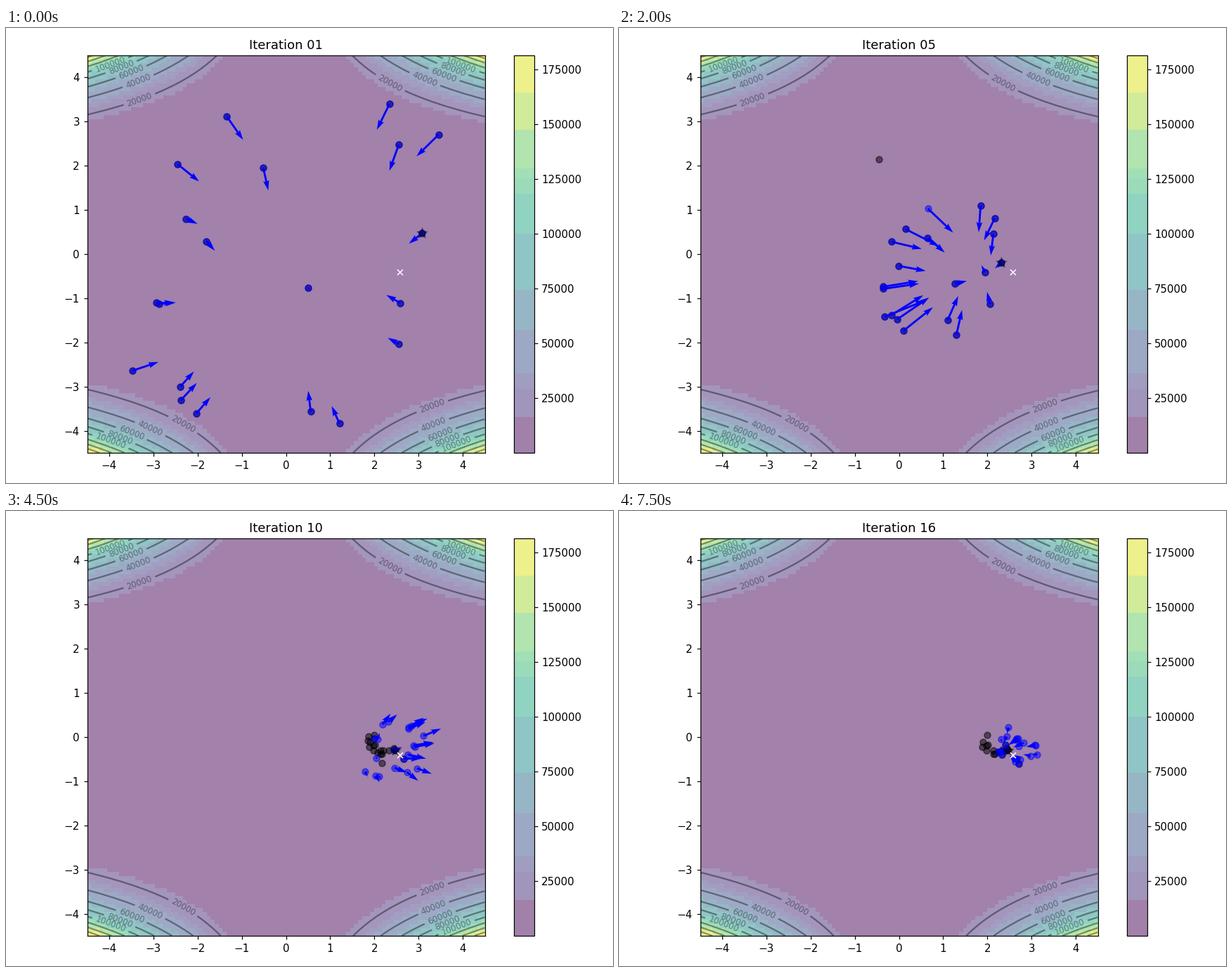
Animation of 864x648 px, one loop 8000 ms. Source, as a matplotlib script:

```python
import numpy as np
import matplotlib.pyplot as plt
from matplotlib.animation import FuncAnimation
from matplotlib.colors import ListedColormap

W, H, DPI = 864, 648, 108
LEFT, BOTTOM, SIDE = 115.5, 43, 566     # plot square in pixels
LIM = 4.5
N_FRAMES, N_PARTICLES = 16, 20
INERTIA, C1, C2 = 0.8, 0.1, 0.1


def cost(x, y):
    return ((1.5 - x - x * y) ** 2
            + (2.25 - x + x * y ** 2) ** 2
            + (2.625 - x + x * y ** 3) ** 2)


def swarm_history(steps):
    """Particle swarm states (positions, velocities, bests, leader)."""
    rng = np.random.RandomState(100)
    pos = rng.rand(2, N_PARTICLES) * 2 * LIM - LIM
    vel = rng.randn(2, N_PARTICLES) * 0.1
    best, best_cost = pos.copy(), cost(*pos)
    leader = best[:, best_cost.argmin()].copy()
    states = []
    for _ in range(steps):
        r1, r2 = rng.rand(2)
        vel = (INERTIA * vel + C1 * r1 * (best - pos)
               + C2 * r2 * (leader[:, None] - pos))
        pos = pos + vel
        now = cost(*pos)
        better = best_cost >= now
        best[:, better] = pos[:, better]
        best_cost = np.minimum(best_cost, now)
        leader = best[:, best_cost.argmin()].copy()
        states.append((pos, vel, best.copy(), leader))
    return states


def banded_viridis():
    edges = np.array([0, 0.0895, 0.159, 0.198, 0.309, 0.41, 0.551,
                      0.652, 0.694, 0.717, 0.813, 0.906, 1])
    shades = (edges[:-1] + edges[1:]) / 2
    shades[0] = 0.01
    band = np.digitize(np.linspace(0, 1, 256), edges[1:-1])
    return ListedColormap(plt.get_cmap("viridis")(shades[band]))


def to_data(px, py):
    scale = 2 * LIM / SIDE
    return (px - LEFT) * scale - LIM, (H - BOTTOM - py) * scale - LIM


def add_axes(x, width):
    return fig.add_axes([x / W, BOTTOM / H, width / W, SIDE / H])


# the first update happens before the first visible state
states = swarm_history(N_FRAMES + 1)[1:]

fig = plt.figure(figsize=(W / DPI, H / DPI), dpi=DPI, facecolor="white")
ax = add_axes(LEFT, SIDE)
cax = add_axes(723.3, SIDE / 20)

axis = np.linspace(-LIM, LIM, 100)
gx, gy = np.meshgrid(axis, axis)
gz = cost(gx, gy)

img = ax.imshow(gz, extent=[-LIM, LIM, -LIM, LIM], origin="lower",
                cmap=banded_viridis(), alpha=0.5, aspect="auto")
fig.colorbar(img, cax=cax)
ax.set_xlim(-LIM, LIM)
ax.set_ylim(-LIM, LIM)

low = gz.argmin()
ax.plot([gx.flat[low]], [gy.flat[low]], marker="x", markersize=5, color="white")

lines = ax.contour(gx, gy, gz, 10, colors="black", alpha=0.4)
label_spots = [
    (190, 102), (188, 75), (178, 63), (164, 56), (148, 51),
    (547, 78), (596, 73), (624, 65), (636, 58.5), (648, 52),
    (253, 563), (206, 569), (179, 576), (162, 583), (149, 588),
    (606, 537), (608, 564), (618, 579), (628, 586.5), (641, 592),
]
ax.clabel(lines, inline=True, fontsize=8, fmt="%.0f",
          manual=[to_data(*p) for p in label_spots])

pos, vel, best, leader = states[0]
best_dots = ax.scatter(*best, marker="o", color="black", alpha=0.5)
dots = ax.scatter(*pos, marker="o", color="blue", alpha=0.5)
arrows = ax.quiver(*pos, *vel, color="blue", width=0.005,
                   angles="xy", scale_units="xy", scale=1)
star = ax.scatter(*leader, marker="*", s=100, color="black", alpha=0.4)
title = ax.set_title("Iteration 01")
ax.set_xlim(-LIM, LIM)
ax.set_ylim(-LIM, LIM)
ax.set_xticks(range(-4, 5))
ax.set_yticks(range(-4, 5))


def draw(i):
    pos, vel, best, leader = states[i]
    title.set_text(f"Iteration {i + 1:02d}")
    best_dots.set_offsets(best.T)
    dots.set_offsets(pos.T)
    arrows.set_offsets(pos.T)
    arrows.XY = pos.T               # keeps angles="xy" tied to the new places
    arrows.set_UVC(*vel)
    star.set_offsets([leader])
    return best_dots, dots, arrows, star, title


anim = FuncAnimation(fig, draw, frames=N_FRAMES, interval=500, repeat=True)
plt.show()
```
